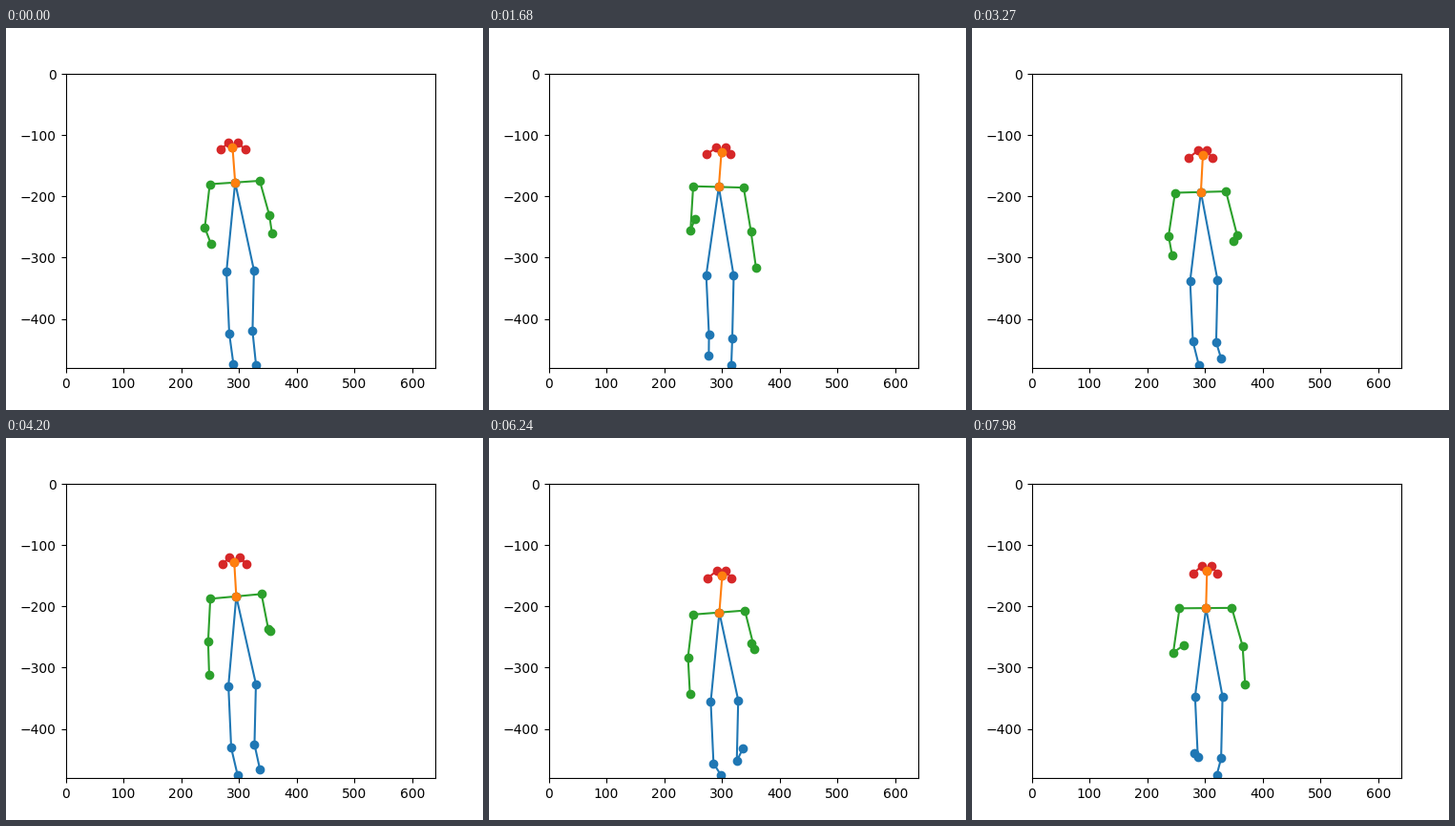
Recreate the animation shown at these times as a matplotlib script. Size 500 by 400 pixels, loop 8 s.

```python
import numpy as np
import matplotlib.pyplot as plt
from matplotlib.animation import FuncAnimation

LOOP, TICK, STEP = 8000, 20, 30      # ms
STRIDE, LIFT = 0.715, 5.12           # seconds per stride, one right-leg lift
RIGHT, LEFT = -1, 1                  # side of the picture, mirrored


def wave(phase, shift=0.0, beats=1):
    """Cosine over the stride, peaking at the given phase."""
    return np.cos(2 * np.pi * beats * (phase - shift))


def arm(phase, side, neck, shoulder):
    """Wrist, elbow, shoulder; the left arm pumps harder."""
    elbow = neck + (side * (34 + 2 * side + 2.5 * wave(phase, 0.47, 2)),
                    43.5 - 3 * side - (4 + 3 * side) * wave(phase, 0.27))
    wrist = neck + (side * (32 + 5 * side - 4 * wave(phase, 0.02)),
                    59 - 28 * wave(phase, 0.12))
    return [wrist, elbow, shoulder]


def leg(phase, side, t, neck, pelvis, tilt):
    """Ankle, knee, hip; the feet keep their place on the floor."""
    hip = pelvis + (side * 14.4, -side * 0.4 * tilt)
    knee = (pelvis[0] + 0.7 + side * 12.2,
            neck[1] + 156.8 - 1.8 * wave(phase, 0.2))
    lift = max(0.0, wave(phase, 0.06)) ** 3
    ankle = (248.2 + 0.1 * t + side * (11.8 + 6.5 * wave(phase, 0.14)),
             352.5 - 28 * lift)
    return [ankle, knee, hip]


def face(nose, dx, dy):
    """Ear, eye, nose, eye, ear; turning the head shifts them sideways."""
    ear = -0.45 * dy - 14.4
    offsets = [(-13.8 - 0.6 * dx, ear), (-5.1 - 0.15 * dx, -4.9), (0, 0),
               (4.9 - 0.3 * dx, -4.9), (11.3 - 0.7 * dx, ear)]
    return [nose + o for o in offsets]


def pose(t):
    """Joint chains of a jogger on the spot, in pixels with y downwards."""
    p = (t - LIFT) / STRIDE
    phases = {RIGHT: p, LEFT: p + 0.5}

    bounce = 10.5 * wave(p, 0.04, 2) - 2 * wave(p, 0.05)
    neck = np.array([239.4 + 0.55 * t + 1.5 * wave(p), 170.8 + bounce])
    pelvis = neck + (3.7 - 2.5 * wave(p, 0.2), 92.7)
    tilt = 0.9 - 1.6 * wave(p, 0.18)
    width = 26.2 + 0.15 * t

    dx = 0.8 + 3.6 * np.cos(2 * np.pi * (t - 2.4) / 4.5)
    dy = -37.5 - 2 * wave(p, 0, 2)
    nose = neck + (dx, dy)

    arms, legs = {}, {}
    for side, phase in phases.items():
        shoulder = neck + (side * width - 0.4, -side * tilt)
        arms[side] = arm(phase, side, neck, shoulder)
        legs[side] = leg(phase, side, t, neck, pelvis, tilt)

    return {"C3": face(nose, dx, dy),
            "C2": arms[RIGHT] + [neck] + arms[LEFT][::-1],
            "C0": legs[RIGHT] + [neck] + legs[LEFT][::-1],
            "C1": [nose, neck]}


def to_data(points):
    x, y = np.array(points).T
    return (x - 62.5) * 640 / 387.5, (48 - y) * 480 / 308


fig, ax = plt.subplots(figsize=(5, 4), dpi=100)
ax.set_xlim(0, 640)
ax.set_ylim(-480, 0)
lines = {c: ax.plot([], [], color=c, marker="o")[0]
         for c in ("C3", "C2", "C0", "C1")}


def draw(i):
    t = (i * TICK + TICK // 2) // STEP * STEP / 1000
    for color, points in pose(t).items():
        lines[color].set_data(*to_data(points))
    return list(lines.values())


anim = FuncAnimation(fig, draw, frames=LOOP // TICK, interval=TICK,
                     init_func=lambda: draw(0), repeat=True, repeat_delay=0)
plt.show()
```
